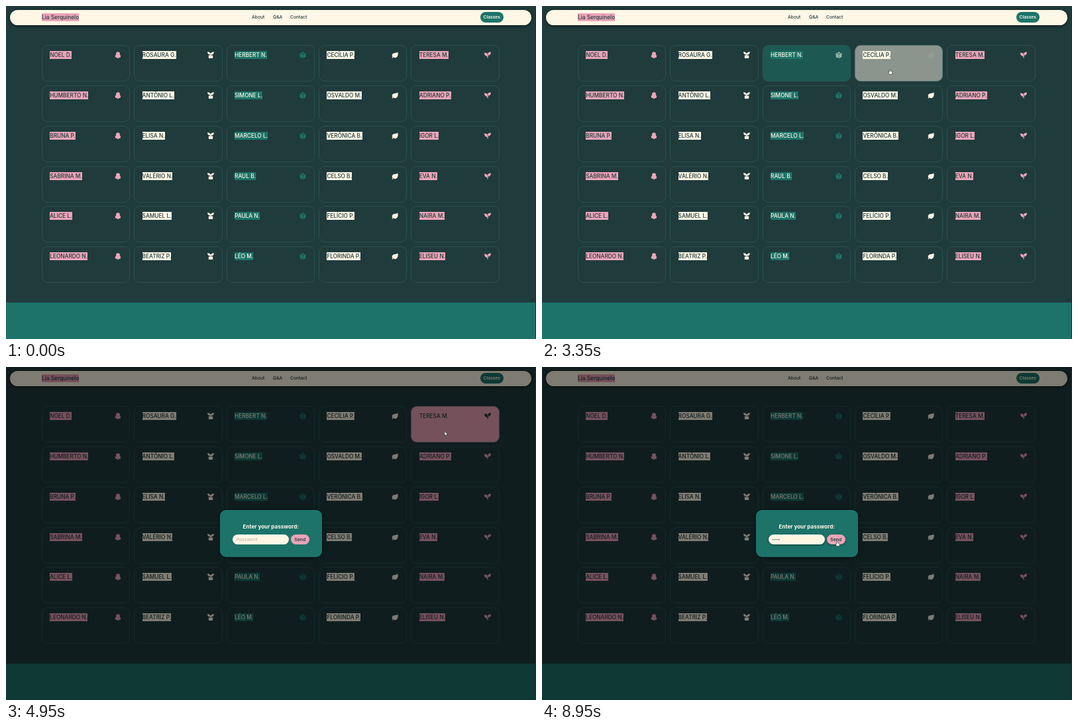
An HTML page for the animation above (9000 ms loop, 800 by 503 pixels).

```html
<!DOCTYPE html>
<html lang="en">
<head>
<meta charset="utf-8">
<title>Classes</title>
<style>
:root { --dark: #203b3c; --teal: #1d7369; --cream: #fef7e6; --pink: #eba4b9; }
html, body { margin: 0; width: 100%; height: 100%; overflow: hidden; }
body { position: relative; background: var(--dark); color: var(--dark); font: 500 8.3px/12px Inter, sans-serif; }
body *, body::after { position: absolute; box-sizing: border-box; white-space: nowrap; }
body::after { content: ""; right: 0; top: 0; width: 1px; height: 100%; background: #1a3031; }
footer { top: 448px; width: 100%; height: 55px; background: var(--teal); }
header { left: 6px; top: 6px; width: 787px; height: 23px; border-radius: 11.5px; background: var(--cream); box-shadow: 0 1px 4px #000b; }
header span { top: 5px; font-size: 6.7px; }
header .logo { left: 48px; font-size: 8.3px; background: var(--pink); }
header .button { left: 709.5px; top: 3px; width: 35.5px; height: 16px; border-radius: 8px; background: var(--teal); color: var(--cream); font-weight: 600; line-height: 16px; text-align: center; }
.card {
  --mix: calc(var(--h, 0) * 100%);
  width: 133.6px; height: 55px; border-radius: 9px;
  border: 1px solid color-mix(in srgb, var(--c) calc(var(--mix) / 2), #275250);
  background: color-mix(in srgb, var(--c) var(--mix), transparent);
}
.card span { left: 11.5px; top: 8px; background: var(--c); color: var(--ink); }
.card svg { left: 108.5px; top: 8px; width: 12px; height: 12px; fill: color-mix(in srgb, var(--ink) var(--mix), var(--c)); }
#shade { width: 100%; height: 100%; background: #00000080; }
#modal { left: 323px; top: 216px; width: 153.5px; height: 71px; border-radius: 9px; background: var(--teal); box-shadow: 0 1px 6px #0006; }
#modal b { width: 100%; top: 18.5px; text-align: center; color: var(--cream); font-weight: 700; font-size: 8.1px; }
#field, #send { top: 36.5px; height: 15.5px; border-radius: 8px; line-height: 15.5px; font-size: 6.8px; }
#field { left: 18.5px; width: 85px; padding-left: 6px; background: var(--cream); }
#send { left: 106.5px; width: 28.5px; background: var(--pink); font-weight: 600; text-align: center; }
#cursor { left: 0; top: 0; width: 12px; height: 14px; overflow: visible; stroke: #1c2526; stroke-width: .6; fill: #fff; }
</style>
</head>
<body>
<header>
  <span class="logo">Lia Serquinelo</span>
  <span style="left:365px">About</span>
  <span style="left:397px">Q&amp;A</span>
  <span style="left:423px">Contact</span>
  <span class="button">Classes</span>
</header>
<footer></footer>
<main id="cards"></main>
<div id="shade"></div>
<div id="modal"><b>Enter your password:</b><div id="field"></div><div id="send">Send</div></div>
<svg id="cursor"><path/></svg>
<script>
const $ = id => document.getElementById(id);
const names = `NOEL D.,ROSAURA G.,HERBERT N.,CECÍLIA P.,TERESA M.
HUMBERTO N.,ANTÔNIO L.,SIMONE L.,OSVALDO M.,ADRIANO P.
BRUNA P.,ELISA N.,MARCELO L.,VERÔNICA B.,IGOR L.
SABRINA M.,VALÉRIO N.,RAUL B.,CELSO B.,EVA N.
ALICE L.,SAMUEL L.,PAULA N.,FELÍCIO P.,NAIRA M.
LEONARDO N.,BEATRIZ P.,LÉO M.,FLORINDA P.,ELISEU N.`.split('\n').map(row => row.split(','));

const colors = ['pink', 'cream', 'teal', 'cream', 'pink'];
const icons = [
  'M-3-1.8a3 3 0 0 1 6 0c0 .6-.1 1-.2 1.3A2.6 2.6 0 0 1 2.4 4.2L.8 3.7 1.3 5H-1.3L-.8 3.7-2.4 4.1A2.5 2.5 0 0 1-2.8-.6Q-3-1-3-1.8z',
  'M-5-4.8C-2-5-.5-3.5 0-2 .5-3.5 2-5 5-4.8 5-2 3-.5.6-.5V.6H3.2V4.2Q3.2 5 2.4 5H-2.4Q-3.2 5-3.2 4.2V.6H-.6V-.5C-3-.5-5-2-5-4.8z',
  'M0-5 2.2-3.6 0-1.6-2.2-3.6zM-4.4-3.4-.3-.9V5L-3.6 3.4Q-4.4 3-4.4 2zM4.4-3.4.3-.9V5L3.6 3.4Q4.4 3 4.4 2z',
  'M4.4-4.8C5.2-1 4.6 4 .2 4.2-1.2 4.3-2 3.8-2.6 3.3L-3.8 5-4.6 4.5-3.6 2.4C-5 .5-4-2.8-.5-3.1 1.5-3.3 3.4-3.2 4.4-4.8z',
  'M-5-3.4C-1.6-3.6.6-1.6.6 1V4.4H-.6V2C-3.6 2-5-.4-5-3.4zM5-4.6C5-1.6 3.6.4 1 .7.9-.7.4-1.6-.2-2.2.8-3.8 2.4-4.6 5-4.6z'
];
const hoverCards = [];
names.forEach((row, r) => row.forEach((name, c) => {
  const card = document.createElement('div');
  card.className = 'card';
  card.style.cssText = `left:${53.7 + c * 139.4}px;top:${59 + r * 60.85}px;--c:var(--${colors[c]});--ink:var(--${c === 2 ? 'cream' : 'dark'})`;
  card.innerHTML = `<span>${name}</span><svg viewBox="-6 -6 12 12"><path d="${icons[c]}"/></svg>`;
  $('cards').append(card);
  if (!r) hoverCards.push(card);
}));

const shapes = {
  arrow: 'M0 0V6.3L1.5 5 2.5 7.3 3.6 6.8 2.6 4.6H4.6z',
  hand: 'M-.8.8Q0-.4.8.8V3.2L3.2 3.9Q4 4.2 3.8 5.2L3.2 8.2H-.6L-2.6 5.2Q-2.6 4.2-.8 5.2z',
  beam: 'M-1 0H1M0 0V7M-1 7H1'
};
// Times at which the pointer enters each card; the last one ends the final hover
const enter = [735, 1740, 2430, 3205, 3970, 5040];
const modalOpen = 4880;
const path = [
  [250, 4, 112], [1200, 100, 95], [1513, 100, 93], [1813, 245, 91.3], [2223, 245, 93],
  [2573, 385, 94.2], [3000, 385, 95], [3350, 525, 95], [3703, 525, 95], [4158, 662, 95.7],
  [4500, 662, 97.3], [5530, 662, 97.3], [6080, 366, 272], [6400, 384, 258],
  [7950, 384, 258], [8550, 445.5, 262.5], [9000, 445.5, 262.5]
];
const ease = (t, start, length) => {
  const x = Math.min(1, Math.max(0, (t - start) / length));
  return x * x * (3 - 2 * x);
};

function pointer(t) {
  const i = Math.max(1, path.findIndex(p => p[0] > t));
  const [a, b] = [path[i - 1], path[i]];
  const k = ease(t, a[0], b[0] - a[0]);
  return [a[1] + (b[1] - a[1]) * k, a[2] + (b[2] - a[2]) * k];
}

function pointerShape(t, x) {
  if (t > 6300) return x < 426 ? 'beam' : x > 430 ? 'hand' : 'arrow';
  const onCard = x > 54 && (x - 54) % 139.4 < 133.4;
  return t < modalOpen && onCard ? 'hand' : 'arrow';
}

function draw(t) {
  hoverCards.forEach((card, i) =>
    card.style.setProperty('--h', ease(t, enter[i], 300) - ease(t, enter[i + 1], 300)));

  $('shade').hidden = $('modal').hidden = t < modalOpen;

  const typed = Math.min(5, Math.max(0, Math.floor((t - 6600) / 200)));
  const field = $('field');
  field.textContent = typed ? '•'.repeat(typed) : 'Password';
  field.style.font = typed ? '500 4.5px/15.5px Inter, sans-serif' : 'italic 400 6.8px/15.5px Inter, sans-serif';
  field.style.color = typed ? 'var(--dark)' : '#b3ada2';
  field.style.boxShadow = t > 6450 ? '0 1px 3px #0007' : 'none';
  $('send').style.boxShadow = `0 1px 3px rgba(0,0,0,${0.45 * ease(t, 8380, 300)})`;

  const [x, y] = pointer(t);
  const cursor = $('cursor');
  cursor.style.transform = `translate(${x}px,${y}px)`;
  cursor.style.visibility = t < 250 || (t > 6800 && t < 7950) ? 'hidden' : 'visible';
  cursor.firstChild.setAttribute('d', shapes[pointerShape(t, x)]);
}

function loop() {
  draw(performance.now() % 9000);
  requestAnimationFrame(loop);
}
loop();
</script>
</body>
</html>
```
